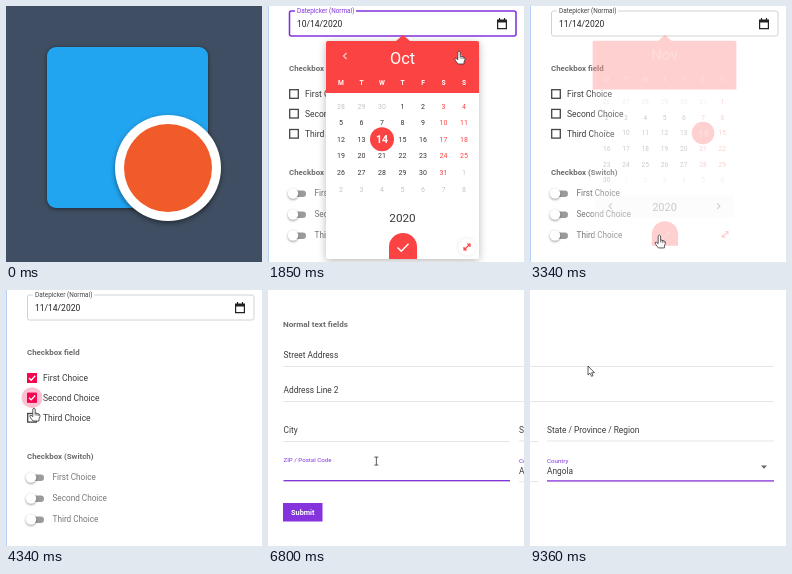
These frames come from a looping animation (256x256 px, 9.46 s). An HTML page with a canvas:

```html
<!DOCTYPE html>
<html lang="en">
<head>
<meta charset="utf-8">
<title>Form styles demo</title>
<style>
html, body { margin: 0; width: 100%; height: 100%; overflow: hidden; background: #fff; }
canvas { display: block; width: 256px; height: 256px; }
</style>
</head>
<body>
<canvas id="stage"></canvas>
<script>
const LOOP = 9460;
const PURPLE = '#8433dd', RED = '#fc4343', PINK = '#f5064f', DARK = '#3a3a3a', LINE = '#e6e6e6';
const canvas = document.getElementById('stage'), c = canvas.getContext('2d');
const dpr = window.devicePixelRatio || 1;
canvas.width = canvas.height = 256 * dpr;

const clamp = v => Math.max(0, Math.min(1, v));
const ease = v => { v = clamp(v); return v * v * (3 - 2 * v); };
const mix = (a, b, k) => a + (b - a) * k;
// Rises to 1 after `on` and falls back to 0 after `off`
const pulse = (t, on, off, d = 140) => ease((t - on) / d) - ease((t - off) / d);

function rect(x, y, w, h, color, r = 0) {
  c.fillStyle = color;
  c.beginPath();
  c.roundRect(x, y, w, h, r);
  c.fill();
}
function disc(x, y, r, color) {
  c.fillStyle = color;
  c.beginPath();
  c.arc(x, y, r, 0, 7);
  c.fill();
}
function stroke(path, color, width) {
  c.strokeStyle = color;
  c.lineWidth = width;
  c.stroke(new Path2D(path));
}
function text(s, x, y, size, color = DARK, weight = 400, align = 'left') {
  c.font = `${weight} ${size}px Roboto, Arial, sans-serif`;
  c.fillStyle = color;
  c.textAlign = align;
  c.fillText(s, x, y + size * 0.36);
}
function shadowed(blur, dy, alpha, draw) {
  c.save();
  c.shadowColor = `rgba(0,0,0,${alpha})`;
  c.shadowBlur = blur * dpr;
  c.shadowOffsetY = dy * dpr;
  draw();
  c.restore();
}

// Pointer stops: time, x, y, shape
const stops = [
  [1000, 150, 110, 'arrow'], [1240, 233, 18, 'arrow'], [1450, 233, 18, 'arrow'],
  [1780, 191, 45, 'hand'], [1990, 191, 45, 'hand'], [2380, 192, 206, 'hand'],
  [2620, 192, 208, 'hand'], [2780, 199, 226, 'hand'], [2890, 199, 232, 'hand'],
  [3130, 136, 238, 'hand'], [3260, 136, 238, 'hand'], [3800, 27, 89, 'hand'],
  [3960, 27, 89, 'hand'], [4180, 27, 107, 'hand'], [4260, 27, 108, 'hand'],
  [4340, 28, 118, 'hand'], [4440, 28, 127, 'hand'], [4540, 28, 127, 'hand'],
  [4700, 28, 187, 'hand'], [4770, 28, 187, 'hand'], [4850, 28, 208, 'hand'],
  [4910, 28, 208, 'hand'], [4990, 28, 229, 'hand'], [5070, 28, 229, 'hand'],
  [5310, 204, 245, 'arrow'],
  [5470, 80, 92, 'arrow'], [5650, 52.5, 70, 'beam'], [5930, 52.5, 70, 'beam'],
  [6080, 62, 101, 'beam'], [6180, 62, 101, 'beam'], [6320, 60, 140, 'beam'],
  [6390, 60, 140, 'beam'], [6520, 66, 180, 'beam'], [6680, 66, 180, 'beam'],
  [7070, 251, 141, 'beam'],
  [7230, 110, 160, 'arrow'], [7430, 84, 140, 'beam'], [7560, 84, 140, 'beam'],
  [7860, 46, 181, 'hand'], [8060, 46, 181, 'arrow'], [8300, 48, 150, 'arrow'],
  [9050, 58, 77, 'arrow'], [9200, 58, 77, 'arrow'], [9300, 58, 69, 'arrow'],
  [9360, 58, 76, 'arrow']
];
const cuts = [5470, 7230, 9360];
const shapes = {
  hand: 'M-1.2 1Q0-1 1.2 1V5L5 6Q6.2 6.5 6 8.5L5 11V13H-1L-4 9Q-5 7-3 7.2L-1.2 8.7Z',
  arrow: 'M0 0V9L2 7.2L3.5 10.3L5 9.7L3.6 6.7H6.5Z',
  beam: 'M-2-4H2M0-4V4M-2 4H2'
};
function pointerAt(t) {
  let i = stops.length - 1;
  while (i > 0 && stops[i][0] > t) i--;
  const a = stops[i], b = stops[i + 1];
  if (!b || cuts.includes(b[0])) return { x: a[1], y: a[2], shape: a[3] };
  const k = ease((t - a[0]) / (b[0] - a[0]));
  return { x: mix(a[1], b[1], k), y: mix(a[2], b[2], k), shape: k > 0.75 ? b[3] : a[3] };
}
function drawPointer(p) {
  c.save();
  c.translate(p.x, p.y);
  c.lineJoin = 'round';
  if (p.shape !== 'beam') {
    c.fillStyle = '#fff';
    c.fill(new Path2D(shapes[p.shape]));
  }
  stroke(shapes[p.shape], '#333', 0.8);
  if (p.shape === 'hand') stroke('M1.2 5V7.5M3 5.7V8M4.7 6.2V8', '#333', 0.6);
  c.restore();
}

function cover() {
  rect(0, 0, 256, 256, '#3f4e62');
  shadowed(4, 1, 0.5, () => rect(41, 41, 161, 161, '#22a5f1', 9));
  shadowed(5, 2, 0.45, () => disc(162, 162, 53, '#fff'));
  disc(162, 162, 44, '#f15a29');
}

function checkbox(y, label, t, at) {
  const on = ease((t - at) / 90);
  const glow = pulse(t, at - 60, at + 190, 110);
  if (glow > 0) disc(26, y, 10.5, `rgba(245,6,79,${0.25 * glow})`);
  c.strokeStyle = on > 0.5 ? PINK : '#444';
  c.lineWidth = 1.3;
  c.strokeRect(21.7, y - 4.3, 8.6, 8.6);
  if (on > 0) {
    c.globalAlpha = on;
    rect(21, y - 5, 10, 10, PINK, 1);
    stroke(`M23 ${y}l2.2 2.2l4-4.4`, '#fff', 1.3);
    c.globalAlpha = 1;
  }
  text(label + ' Choice', 37, y, 8.5);
}

function toggle(y, label, t, at) {
  const on = ease((t - at) / 120), x = 25 + 10 * on;
  const glow = pulse(t, at - 60, at + 170, 100);
  rect(22, y - 3, 16, 6.5, on > 0.5 ? '#fa9bb8' : '#9b9b9b', 3.2);
  if (glow > 0) disc(x, y, 12, `rgba(245,6,79,${0.18 * glow})`);
  shadowed(2.5, 1, 0.4, () => disc(x, y, 5.2, on > 0.5 ? PINK : '#fff'));
  text(label + ' Choice', 46.5, y, 8.2, '#777');
}

const column = i => 73 + i * 20.5;
function days(first, length, previous, alpha) {
  c.save();
  c.globalAlpha *= alpha;
  for (let i = 0; i < 42; i++) {
    const n = i - first + 1, inside = n > 0 && n <= length;
    const day = n < 1 ? previous + n : n > length ? n - length : n;
    const x = column(i % 7), y = 100 + Math.floor(i / 7) * 16.6;
    if (inside && day === 14) {
      disc(x, y, 12, RED);
      text(day, x, y, 10.5, '#fff', 700, 'center');
    } else {
      const color = !inside ? '#c4c4c4' : i % 7 > 4 ? RED : '#333';
      text(day, x, y, 7, color, 400, 'center');
    }
  }
  c.restore();
}

function chevrons(y, color) {
  stroke(`M78.5 ${y - 3}l-3 3l3 3M190.5 ${y - 3}l3 3l-3 3`, color, 1.1);
}

function calendar(t, p) {
  const open = pulse(t, 1320, 3240, 150);
  if (open <= 0) return;
  const flip = ease((t - 1970) / 160), cx = 134.5;
  const inHead = p.y > 34 && p.y < 66 && p.x > 58 && p.x < 211;
  const inYear = p.y > 197 && p.y < 229 && p.x > 61 && p.x < 208;
  c.save();
  c.globalAlpha = open;
  c.translate(cx, 30);
  c.scale(mix(0.92, 1, open), mix(0.92, 1, open));
  c.translate(-cx, -30);
  shadowed(9, 2, 0.28 * open * open, () => rect(58, 35, 153, 218, '#fff', 2));
  c.fillStyle = RED;
  c.fill(new Path2D('M128 35L135 29L142 35Z'));
  rect(58, 35, 153, 52, RED, [2, 2, 0, 0]);
  const weight = inHead ? 400 : 500;
  c.globalAlpha = open * (1 - flip);
  text('Oct', cx, 52 - 5 * flip, 16.3, '#fff', weight, 'center');
  c.globalAlpha = open * flip;
  text('Nov', cx, 55 - 5 * flip, 16.3, '#fff', weight, 'center');
  c.globalAlpha = open;
  if (inHead) chevrons(50, 'rgba(255,255,255,.75)');
  [...'MTWTFSS'].forEach((d, i) => text(d, column(i), 77, 6.7, '#fff', 700, 'center'));
  days(3, 31, 30, 1 - flip);
  days(6, 30, 31, flip);
  if (inYear) {
    rect(61, 200, 147, 23, '#f4f4f4');
    chevrons(211, '#444');
  }
  text('2020', cx, 211.5, 11.7, DARK, 400, 'center');
  rect(121, 227, 28, 26, RED, [14, 14, 0, 0]);
  stroke('M129.5 241.5l3.8 3.8l7.2-7.6', '#fff', 1.4);
  shadowed(4, 0, 0.1 * open, () => disc(199, 241, 8.5, '#fff'));
  stroke('M196 244L202 238M199 238H202V241M196 241V244H199', RED, 1.2);
  c.restore();
}

function choices(t, p) {
  rect(0, 0, 256, 256, '#fff');
  rect(0, 0, 1, 256, '#b5d2f5');
  const focus = pulse(t, 1260, 3260, 80) > 0.5;
  c.strokeStyle = focus ? PURPLE : '#d2d2d2';
  c.lineWidth = focus ? 1.6 : 1;
  c.beginPath();
  c.roundRect(21.5, 5, 226.5, 25, 2);
  c.stroke();
  rect(27, 3, 61, 4, '#fff');
  text('Datepicker (Normal)', 29, 4.5, 6.4, focus ? PURPLE : '#444');
  text(t < 1990 ? '10/14/2020' : '11/14/2020', 29, 17.5, 8.5, '#222');
  stroke('M229.6 14.5H238.4V22.6H229.6ZM231.5 12V14M236.5 12V14', '#222', 1.2);
  rect(229, 13.5, 10, 3, '#222');
  text('Checkbox field', 21, 62.5, 7.9, '#6c6c6c', 700);
  text('Checkbox (Switch)', 21, 166, 7.9, '#6c6c6c', 700);
  checkbox(88, 'First', t, 3940);
  checkbox(107.7, 'Second', t, 4230);
  checkbox(127.8, 'Third', t, 4500);
  toggle(187.5, 'First', t, 4740);
  toggle(208.5, 'Second', t, 4890);
  toggle(229.5, 'Third', t, 5030);
  calendar(t, p);
}

// Text field with a label that floats and an underline that grows from its middle
function field(label, x, y, width, focus = 0, raised = focus, value = '', t = 0) {
  text(label, x, y - 10 * raised, mix(8.35, 6.15, raised), raised > 0.5 ? PURPLE : DARK);
  if (value) text(value, x, y + 0.7, 8.35);
  rect(x, y + 11, width, 1, LINE);
  if (focus > 0) rect(x + width / 2 * (1 - focus), y + 10, width * focus, 1.3, PURPLE);
  if (t && focus > 0.9 && t % 1060 < 700) rect(x + 2, y - 2, 0.8, 8, '#a77be0');
}

const countries = ['', 'Afghanistan', 'Albania', 'Algeria', 'American Samoa', 'Andorra', 'Angola',
  'Antarctica', 'Antigua and Barbuda', 'Argentina', 'Armenia', 'Aruba', 'Australia'];
function countryList(p) {
  const row = 12.2;
  const hover = Math.round((Math.min(p.y, 152) - 4) / row);
  rect(15, -2, 232, 160, '#999');
  rect(15.6, -2, 230.8, 159.4, '#fff');
  countries.forEach((name, i) => {
    const y = 4 + i * row;
    if (i === hover) rect(15.6, y - row / 2, 230.8, row, '#1e80e8');
    text(name, 18, y, 8, i === hover ? '#fff' : DARK);
  });
}

function address(t, p) {
  const right = t >= 7230, listOpen = t >= 8050 && t < 9230;
  rect(0, 0, 256, 256, '#fff');
  c.save();
  if (right) c.translate(-234, 0);
  text('Normal text fields', 15, 34, 8.1, '#6c6c6c', 700);
  field('Street Address', 15.5, 65, 462.5, pulse(t, 5620, 6080), undefined, '', t - 5400);
  field('Address Line 2', 15.5, 100, 462.5, pulse(t, 6080, 6330));
  field('City', 15.5, 140, 226.5, pulse(t, 6330, 6530));
  field('ZIP / Postal Code', 15.5, 180, 226.5, pulse(t, 6530, 7150));
  field('State / Province / Region', 251, 139.5, 227, pulse(t, 7450, 8040));
  const country = right ? ease((t - 8040) / 140) : 0;
  const chosen = !right || t >= 9230;
  field('Country', 251, 180.3, 227, country, right ? country : 1, chosen ? 'Angola' : '');
  c.fillStyle = '#666';
  c.fill(new Path2D('M465 175.5H471L468 178.7Z'));
  rect(15, 213, 39.5, 18.5, PURPLE);
  text('Submit', 34.8, 222.3, 7.3, '#fff', 700, 'center');
  c.restore();
  if (listOpen) countryList(p);
}

const start = performance.now();
function frame() {
  const t = (performance.now() - start) % LOOP;
  c.setTransform(dpr, 0, 0, dpr, 0, 0);
  if (t < 1000) cover();
  else {
    const p = pointerAt(t);
    (t < 5470 ? choices : address)(t, p);
    drawPointer(p);
  }
  requestAnimationFrame(frame);
}
frame();
</script>
</body>
</html>
```
